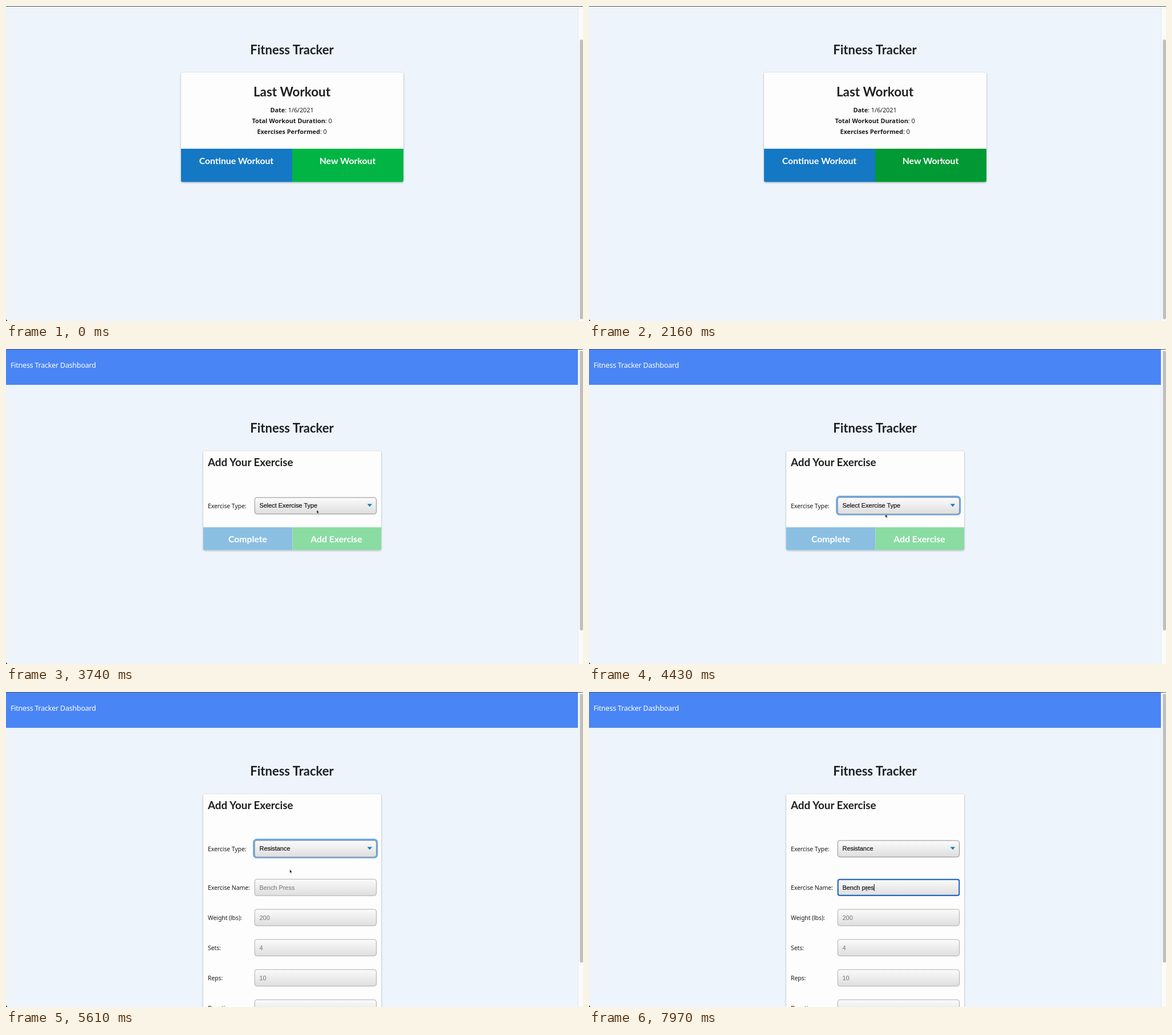
An HTML page for the animation above (8 s loop, 1012 by 554 pixels).

```html
<!DOCTYPE html>
<html lang="en">
<head>
<meta charset="utf-8">
<title>Fitness Tracker</title>
<style>
  html, body { margin: 0; width: 100%; height: 100%; overflow: hidden; background: #edf4fb; }
  svg { display: block; width: 100%; height: 100%; }
  .head { font: 700 22px Lato, sans-serif; fill: #1e1f20; }
  .button { font: 700 15.75px Lato, sans-serif; fill: #fff; }
  .body { font: 10.9px "Noto Sans", sans-serif; fill: #1c1c1c; }
  .label { font-size: 10.5px; letter-spacing: -.1px; }
  .field { font: 10.92px "Liberation Sans", Arial, sans-serif; fill: #111; stroke: #111; stroke-width: .2px; white-space: pre; }
  .hint { fill: #757575; stroke: none; }
  .middle { text-anchor: middle; }
  .shadow { filter: drop-shadow(0 1px 1.5px rgba(60, 70, 80, .45)); }
</style>
</head>
<body>
<svg id="stage" viewBox="0 0 1012 554" preserveAspectRatio="none"></svg>
<script>
const LOOP = 8000, STEP = 98.5;
const stage = document.getElementById('stage');

const rect = (x, y, w, h, fill, extra = '') =>
  `<rect x="${x}" y="${y}" width="${w}" height="${h}" fill="${fill}" ${extra}/>`;
const text = (x, y, cls, content, extra = '') =>
  `<text x="${x}" y="${y}" class="${cls}" ${extra}>${content}</text>`;
const box = (y, border = '#adadad') =>
  rect(436.2, y + .2, 213.3, 29, 'url(#shade)', `rx="4" stroke="${border}"`);
const stat = (y, name, value) => text(501.5, y, 'body middle',
  `<tspan font-weight="700">${name}</tspan><tspan letter-spacing="-.1">: ${value}</tspan>`);
const row = (y, name, hint) => box(y) + text(354, y + 19.3, 'body label', name) +
  text(444.5, y + 18.5, 'field hint', hint);

stage.innerHTML = `
  <defs>
    <linearGradient id="shade" x2="0" y2="1">
      <stop stop-color="#fbfbfb"/><stop offset="1" stop-color="#dedede"/>
    </linearGradient>
    <clipPath id="homeClip">${rect(307, 117, 390, 192.5, '#000', 'rx="3"')}</clipPath>
    <clipPath id="formClip">${rect(346, 179.5, 312, 174, '#000', 'rx="3"')}</clipPath>
  </defs>
  ${rect(0, 0, 1012, 554, '#edf4fb')}

  <g id="home">
    ${text(501.5, 85, 'head middle', 'Fitness Tracker')}
    ${rect(307, 117, 390, 192.5, '#fdfdfd', 'rx="3" class="shadow"')}
    <g clip-path="url(#homeClip)">
      ${rect(307, 251, 195, 59, '#1478c4')}
      ${rect(502, 251, 195, 59, '#00b544', 'id="newButton"')}
    </g>
    ${text(501.5, 159, 'head middle', 'Last Workout', 'style="font-size:22.4px"')}
    ${stat(187.3, 'Date', '1/6/2021')}
    ${stat(206, 'Total Workout Duration', '0')}
    ${stat(224.6, 'Exercises Performed', '0')}
    ${text(404, 277.5, 'button middle', 'Continue Workout')}
    ${text(599, 277.5, 'button middle', 'New Workout')}
  </g>

  <g id="form">
    ${rect(0, 0, 1003, 63, '#4a85f6')}
    ${text(8, 33, 'body', 'Fitness Tracker Dashboard', 'style="font-size:12.48px;letter-spacing:-.21px;fill:#fff"')}
    ${text(501.5, 147.3, 'head middle', 'Fitness Tracker')}
    ${rect(346, 179.5, 312, 174, '#fdfdfd', 'id="card" rx="3" class="shadow"')}
    ${text(354, 205.8, 'head', 'Add Your Exercise', 'style="font-size:18.8px"')}
    ${text(354, 280, 'body label', 'Exercise Type:')}
    ${rect(434.7, 259.7, 216, 31.3, 'none', 'id="selectRing" rx="5" stroke="#69a9ee" stroke-width="3.2"')}
    ${box(261, '#8f8f8f')}
    ${text(444.5, 279.2, 'field', '', 'id="choice"')}
    <path d="M633.7 272.6h8.4l-4.2 4.8z" fill="#0b7dbd"/>
    <g id="actions" clip-path="url(#formClip)">
      ${rect(346, 313.5, 156.5, 41, '#8bbfe2')}
      ${rect(502.5, 313.5, 156, 41, '#8adca2')}
      ${text(424, 340, 'button middle', 'Complete')}
      ${text(579.5, 340, 'button middle', 'Add Exercise')}
    </g>
    <g id="details">
      ${row(329, 'Exercise Name:', '')}
      ${row(382, 'Weight (lbs):', '200')}
      ${row(435, 'Sets:', '4')}
      ${row(488, 'Reps:', '10')}
      ${row(541, 'Duration', '')}
      ${rect(436.7, 329.8, 212.6, 28, 'none', 'id="nameRing" rx="3" stroke="#1560bd" stroke-width="2"')}
      ${text(444.5, 347.5, 'field', '', 'id="name"')}
      ${rect(445, 338, 1, 12, '#000', 'id="caret"')}
    </g>
  </g>

  ${rect(1003, 0, 9, 554, '#fafafa')}
  ${rect(1003, 0, 1, 554, '#e6e8ea')}
  ${rect(1006.5, 0, 5.5, 490, '#bfbfbf', 'id="thumb" rx="2.7"')}
  ${rect(0, 0, 1012, 1, '#4b535d')}
  <path d="M0 550.5Q.5 553.5 3 554H0z" fill="#111"/>

  <g id="cursor">
    <path id="arrow" d="M0 0V6.2L1.4 5L2.4 7.4L3.5 6.9L2.5 4.6H4.4z" fill="#111" stroke="#fff" stroke-width=".5"/>
    <path id="hand" d="M2.2 5.6V1.2Q3 0 3.8 1.2V3.6L6.8 4.4V7L6 9H3L.6 6V5z" fill="#fff" stroke="#222" stroke-width=".7"/>
    <path id="beam" d="M-1.5 -3.5Q0 -3.5 0 -2.5Q0 -3.5 1.5 -3.5M0 -2.5V2.5M-1.5 3.5Q0 3.5 0 2.5Q0 3.5 1.5 3.5" fill="none" stroke="#555" stroke-width=".8"/>
  </g>`;

const part = Object.fromEntries([...stage.querySelectorAll('[id]')].map(el => [el.id, el]));
const show = (el, on) => { el.style.display = on ? '' : 'none'; };

// Pointer waypoints: time, x, y
const path = [
  [98, 302, 72], [492, 686, 292], [886, 610, 258], [985, 613, 258], [1280, 613, 258],
  [1576, 614, 265], [2167, 614, 265], [2265, 616, 266], [2561, 616, 266], [2856, 552, 282],
  [3053, 552, 283], [3349, 547, 284], [3447, 547, 284], [3743, 545, 283], [4137, 545, 283],
  [4629, 503, 295], [5516, 503, 295], [5812, 487, 346]
];
const typing = [
  [6810, 'B'], [7100, 'Be'], [7200, 'Ben'], [7390, 'Benc'], [7490, 'Bench'],
  [7590, 'Bench '], [7680, 'Bench p'], [7780, 'Bench pre'], [7970, 'Bench pres']
];

function pointerAt(time) {
  const next = path.findIndex(p => p[0] > time);
  if (next < 0) return path[path.length - 1].slice(1);
  if (next === 0) return path[0].slice(1);
  const [t0, x0, y0] = path[next - 1], [t1, x1, y1] = path[next];
  const k = (time - t0) / (t1 - t0);
  return [x0 + (x1 - x0) * k, y0 + (y1 - y0) * k];
}

function render(t) {
  const onHome = t < 2260, expanded = t >= 5310, naming = t >= 5910;
  const [x, y] = pointerAt(Math.floor((t + 15) / STEP) * STEP + .5);
  const hover = onHome && x > 502 && y > 251;

  show(part.home, onHome);
  show(part.form, !onHome);
  part.newButton.setAttribute('fill', t >= 2160 ? '#009933' : hover && t >= 90 ? '#00a73b' : '#00b544');

  show(part.actions, !expanded);
  show(part.details, expanded);
  part.card.setAttribute('height', expanded ? 440 : 174);
  part.choice.textContent = expanded ? 'Resistance' : 'Select Exercise Type';
  part.selectRing.style.opacity = t < 3940 || naming ? 0 : t < 4040 ? .5 : 1;

  const typed = (typing.filter(([start]) => start <= t).pop() || [0, ''])[1];
  part.name.textContent = typed || 'Bench Press';
  part.name.classList.toggle('hint', !typed);
  show(part.nameRing, naming);
  show(part.caret, naming && (t < 6410 || typed));
  if (expanded) part.caret.setAttribute('x', typed ? 444.5 + part.name.getComputedTextLength() : 444.7);

  part.thumb.setAttribute('y', onHome ? 59 : 3);
  part.thumb.setAttribute('height', onHome ? 492 : expanded ? 473 : 492);

  const beam = t >= 5800;
  show(part.cursor, t >= 90);
  show(part.hand, hover);
  show(part.beam, beam);
  show(part.arrow, !hover && !beam);
  part.cursor.setAttribute('transform', `translate(${x} ${y})`);
}

function tick() {
  render(performance.now() % LOOP);
  requestAnimationFrame(tick);
}
tick();
</script>
</body>
</html>
```
